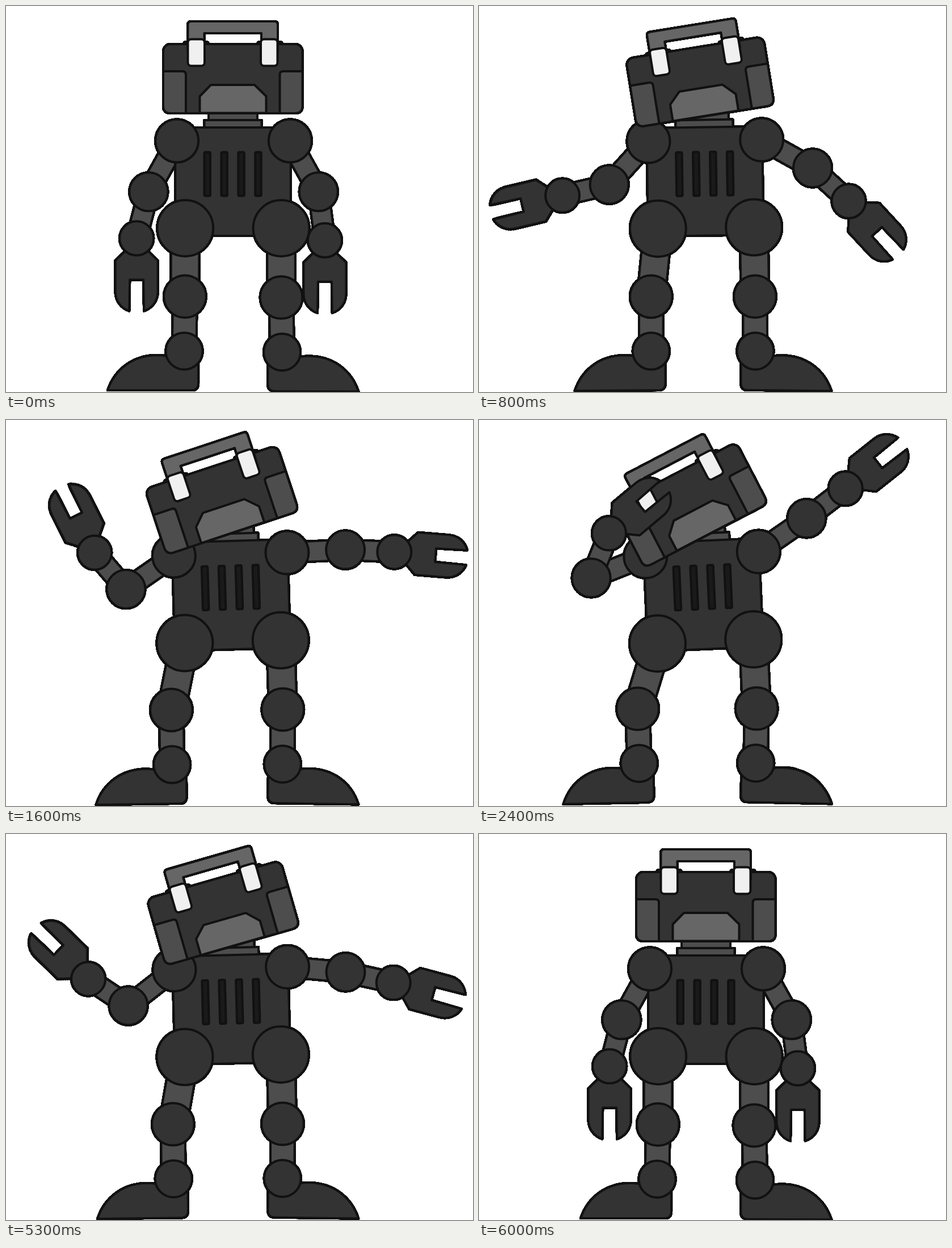
Write an HTML page that moves like this. It is 823 px wide and 680 px high and loops after 6100 ms.

```html
<!DOCTYPE html>
<html lang="en">
<head>
<meta charset="utf-8">
<title>Dabbing robot</title>
<style>
  html, body { margin: 0; width: 100%; height: 100%; overflow: hidden; background: #fff; }
  svg { display: block; width: 100%; height: 100%; }
</style>
</head>
<body>
<svg viewBox="0 0 823 680">
  <!-- Hard outer edges: any partly covered pixel becomes solid -->
  <filter id="crisp" filterUnits="userSpaceOnUse" x="0" y="0" width="823" height="680" color-interpolation-filters="sRGB">
    <feComponentTransfer><feFuncA type="linear" slope="12"/></feComponentTransfer>
  </filter>
  <g id="robot" filter="url(#crisp)" stroke="#111" stroke-width="4" stroke-linejoin="round"></g>
</svg>
<script>
const DARK = '#333', MID = '#4d4d4d', LIGHT = '#666', PALE = '#f0f0f0';
const STEP = 100, RISE = 24, HOLD_END = 48, FALL = 12, LOOP = 6100;
const UPPER_LEN = 102.8, SHIN_LEN = 96.2;
const robot = document.getElementById('robot');

function add(tag, attrs, parent = robot) {
  const el = document.createElementNS('http://www.w3.org/2000/svg', tag);
  for (const key in attrs) el.setAttribute(key, attrs[key]);
  parent.appendChild(el);
  return el;
}
const group = () => add('g', {});
const path = (d, fill, parent) => add('path', { d, fill }, parent);
const rect = (x, y, width, height, rx, fill, parent) =>
  add('rect', { x, y, width, height, rx, fill }, parent);
const ball = r => add('circle', { r, fill: DARK });
const bar = (len, w) => rect(0, -w / 2, len, w, 0, MID);

const place = (el, [x, y], angle = 0, flip = 1) =>
  el.setAttribute('transform', `translate(${x} ${y}) rotate(${angle}) scale(${flip} 1)`);
const mix = ([a, b], p) => a + (b - a) * p;

function spin([x, y], [cx, cy], angle) {
  const t = angle * Math.PI / 180, c = Math.cos(t), s = Math.sin(t);
  return [cx + (x - cx) * c - (y - cy) * s, cy + (x - cx) * s + (y - cy) * c];
}
const reach = ([x, y], len, angle) => spin([x + len, y], [x, y], angle);

// Joint angles run from the standing pose to the dab, in degrees.
const legs = [
  { hip: [315.8, 391.5], thighLen: 120.2, thigh: [90.2, 106.9], shin: [90.8, 88.5], foot: [0, -1.2], flip: 1 },
  { hip: [485, 391.5], thighLen: 122, thigh: [90, 87.4], shin: [89.1, 90.9], foot: [0.2, 1.2], flip: -1 }
];
const arms = [
  { shoulder: [301.2, 237.4], foreLen: 84.7, upper: [119, 158.4], fore: [104.5, 291.7], hand: [90, 320] },
  { shoulder: [500.8, 237.4], foreLen: 86.3, upper: [60.9, -34.6], fore: [82.6, -37.5], hand: [90, -38.3] }
];

// Parts are built from back to front.
for (const leg of legs) {
  leg.footEl = path('M-135 69C-122 30 -88 7 -48 7Q-30 7 -16 12L25 20V57Q25 69 13 69Z', DARK);
  leg.thighEl = bar(leg.thighLen, 49.5);
  leg.shinEl = bar(SHIN_LEN, 42.5);
  leg.kneeEl = ball(37.3);
  leg.ankleEl = ball(32.5);
}
for (const arm of arms) arm.upperEl = bar(UPPER_LEN, 36);

const torso = group();
rect(357, 188, 86, 16, 0, MID, torso);
rect(349.5, 201, 101, 14, 0, MID, torso);
rect(298.2, 214, 203.6, 191, 2, DARK, torso);
for (let i = 0; i < 4; i++) rect(349.5 + i * 29.9, 257.5, 10.5, 77, 2, '#1a1a1a', torso);

for (const arm of arms) arm.shoulderEl = ball(38);
for (const leg of legs) leg.hipEl = ball(49.4);

const head = group();
for (const x of [313, 443]) path(`M${x} 68Q${x} 63 ${x + 5} 63H${x + 39}Q${x + 44} 63 ${x + 44} 68Z`, DARK, head);
rect(277, 67, 245.5, 122, 13, DARK, head);
path('M277 115H311Q317 115 317 121V189H290Q277 189 277 176Z', MID, head);
path('M522.5 115H488.5Q482.5 115 482.5 121V189H509.5Q522.5 189 522.5 176Z', MID, head);
path('M341.5 188.5V159L361 139H438L458.5 159V188.5Z', LIGHT, head);
path('M320.5 80V33Q320.5 27 326.5 27H473Q479 27 479 33V80H450V48H349.5V80Z', LIGHT, head);
// Case body between the handle's feet
add('rect', { x: 352, y: 69, width: 96, height: 14, fill: DARK, stroke: 'none' }, head);
for (const x of [320.5, 449]) rect(x, 58.5, 29.5, 47, 6, PALE, head);

for (const arm of arms) {
  arm.foreEl = bar(arm.foreLen, 36);
  arm.handEl = path('M22 -20L39 -37.5H94C110 -37.5 123 -28 128 -13L73 -12V12L128 13' +
    'C123 28 110 37.5 94 37.5H39L22 20Z', DARK);
  arm.elbowEl = ball(34);
  arm.wristEl = ball(30);
}

function pose(p) {
  const lean = -2.5 * p, pivot = [367, 420];
  torso.setAttribute('transform', `rotate(${lean} ${pivot})`);
  head.setAttribute('transform', `rotate(${-27.5 * p} 430.5 194.5)`);

  for (const leg of legs) {
    const thigh = mix(leg.thigh, p), shin = mix(leg.shin, p);
    const hip = spin(leg.hip, pivot, lean);
    const knee = reach(hip, leg.thighLen, thigh);
    const ankle = reach(knee, SHIN_LEN, shin);
    place(leg.hipEl, hip);
    place(leg.thighEl, hip, thigh);
    place(leg.kneeEl, knee);
    place(leg.shinEl, knee, shin);
    place(leg.ankleEl, ankle);
    place(leg.footEl, ankle, mix(leg.foot, p), leg.flip);
  }

  for (const arm of arms) {
    const upper = mix(arm.upper, p), fore = mix(arm.fore, p);
    const shoulder = spin(arm.shoulder, pivot, lean);
    const elbow = reach(shoulder, UPPER_LEN, upper);
    const wrist = reach(elbow, arm.foreLen, fore);
    place(arm.shoulderEl, shoulder);
    place(arm.upperEl, shoulder, upper);
    place(arm.elbowEl, elbow);
    place(arm.foreEl, elbow, fore);
    place(arm.wristEl, wrist);
    place(arm.handEl, wrist, mix(arm.hand, p));
  }
}

// Ten poses a second: rise, hold the dab, then return twice as fast.
function progress(ms) {
  const k = Math.floor(ms % LOOP / STEP);
  return k <= HOLD_END ? Math.min(k / RISE, 1) : 1 - (k - HOLD_END) / FALL;
}

const start = performance.now();
function tick() {
  pose(progress(performance.now() - start));
  requestAnimationFrame(tick);
}
tick();
</script>
</body>
</html>
```
